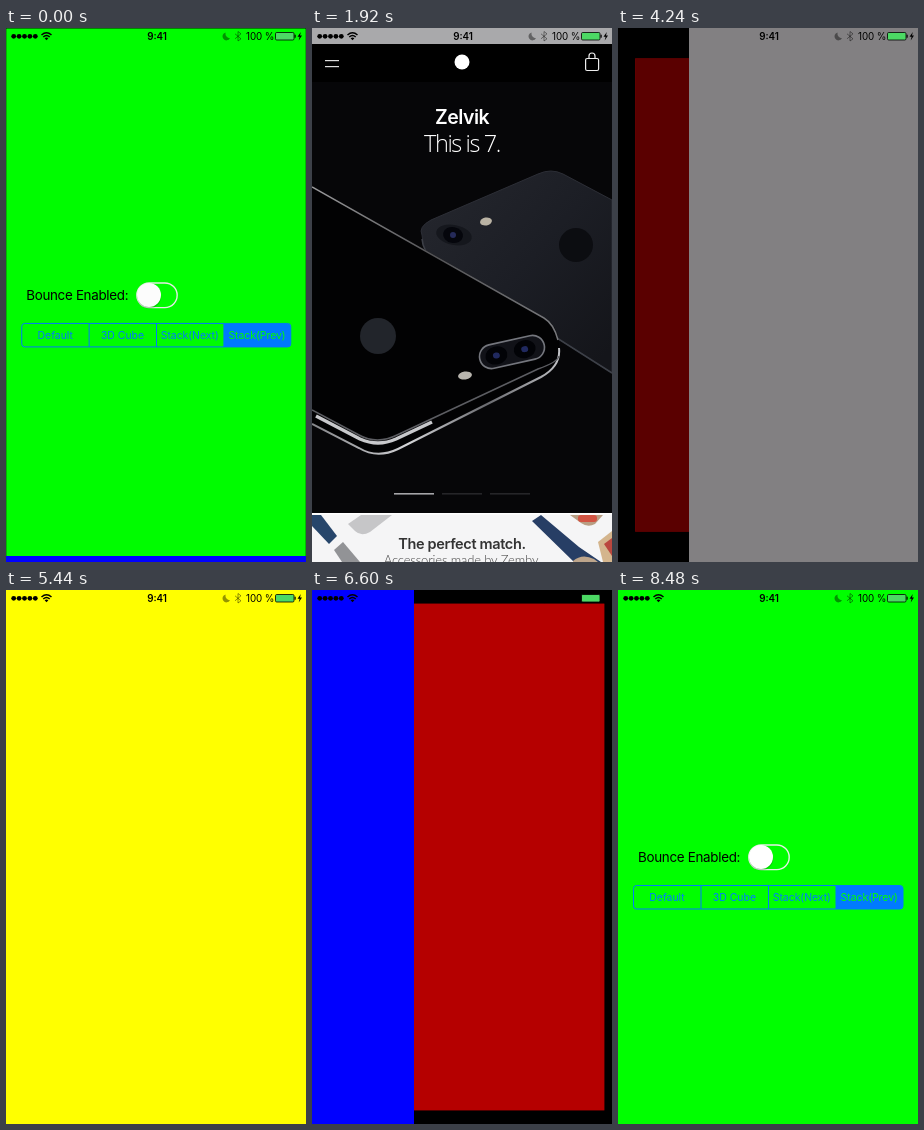
Recreate the animation shown at these times as an HTML page with a canvas. Size 300 by 534 pixels, loop 8.52 s.

```html
<!DOCTYPE html>
<html>
<head>
<meta charset="utf-8">
<style>
html, body { margin: 0; width: 100%; height: 100%; overflow: hidden; background: #000; }
canvas { display: block; }
</style>
</head>
<body>
<canvas width="300" height="534"></canvas>
<script>
const W = 300, H = 534, LOOP = 8520;
const ctx = document.querySelector('canvas').getContext('2d');

function text(str, x, y, font, color, spacing = 0, align = 'center') {
  ctx.font = font + ', sans-serif';
  ctx.fillStyle = color;
  ctx.letterSpacing = spacing + 'px';
  ctx.textAlign = align;
  ctx.fillText(str, x, y);
}

function rect(x, y, w, h, color) {
  ctx.fillStyle = color;
  ctx.fillRect(x, y, w, h);
}

function shape(d, fill, stroke, width = 1) {
  const path = new Path2D(d);
  if (fill) { ctx.fillStyle = fill; ctx.fill(path); }
  if (stroke) { ctx.strokeStyle = stroke; ctx.lineWidth = width; ctx.stroke(path); }
}

function oval(x, y, rx, ry, fill, angle = 0) {
  ctx.beginPath();
  ctx.ellipse(x, y, rx, ry, angle, 0, 7);
  ctx.fillStyle = fill;
  ctx.fill();
}

function box(x, y, w, h, r, fill, stroke, width = 1) {
  ctx.beginPath();
  ctx.roundRect(x, y, w, h, r);
  if (fill) { ctx.fillStyle = fill; ctx.fill(); }
  if (stroke) { ctx.strokeStyle = stroke; ctx.lineWidth = width; ctx.stroke(); }
}

function gradient(x0, y0, x1, y1, ...colors) {
  const g = ctx.createLinearGradient(x0, y0, x1, y1);
  colors.forEach((c, i) => g.addColorStop(i / (colors.length - 1), c));
  return g;
}

const solid = color => () => rect(0, 0, W, H, color);

function settings() {
  rect(0, 0, W, H, '#0f0');
  text('Bounce Enabled:', 20, 272, '13.4px Inter', '#000', -0.3, 'left');

  box(130.8, 255, 40.4, 24.6, 12.3, null, '#e8eee8', 1.4);
  oval(143.2, 268.6, 12, 12, 'rgba(0,0,0,.18)');
  oval(143, 267, 12, 12, '#fff');

  const blue = '#007aff';
  box(217.5, 296, 67.5, 23, [0, 3, 3, 0], blue);
  box(15.5, 295.5, 269.5, 23.5, 3, null, blue);
  [82.5, 150].forEach(x => rect(x, 296, 1, 23, blue));
  ['Default', '3D Cube', 'Stack(Next)', 'Stack(Prev)'].forEach((label, i) =>
    text(label, 49 + i * 67.4, 311, '10.5px Inter', i < 3 ? blue : '#0f0', -0.05));
}

function backPhone() {
  const body = gradient(120, 160, 300, 320, '#24262d', '#1c1e25', '#14151a');
  shape('M110 207Q106 199 119 192L226 146Q239 140 251 146L300 172V345L122 232Q111 224 110 207Z',
    body, '#2c2e36');
  shape('M110 211Q111 224 122 232L300 345', null, '#3d4048', 1.5);
  oval(142, 207, 18, 10, '#15171d', 0.2);
  oval(141, 207, 10, 8, '#05060c', 0.2);
  oval(141, 207, 3, 3, '#252a59');
  oval(174, 193.5, 6, 4, '#bab3a4', -0.2);
  oval(264, 217, 17, 17, '#0c0d11');
}

function frontPhone() {
  shape('M0 158L232 289Q249 299 247 327Q246 341 229 349L86 421Q65 431 47 420L0 397Z', '#020203');
  shape('M0 159L232 290Q242 296 246 312', null, gradient(0, 160, 240, 300, '#9a9a9c', '#535356', '#77787c'), 1.5);
  shape('M247 320Q249 338 229 349L86 421Q65 431 47 420L0 396',
    null, gradient(0, 400, 247, 320, '#85868a', '#d5d6d9', '#6a6b70', '#c3c4c8'), 2);
  shape('M247 328Q246 334 226 341L85 407Q65 417 47 407L0 382', null, '#5c5d62', 1.5);
  shape('M4 388L48 411Q66 419 84 411L120 394', null, '#c8c9cc', 3.5);

  ctx.save();
  ctx.translate(200, 324);
  ctx.rotate(-0.22);
  box(-33, -12, 66, 24, 12, '#111218', '#74767d', 1.6);
  for (const x of [-16, 13]) {
    oval(x, 0, 11, 9, '#020307');
    oval(x, 0, 3.5, 3, '#20295f');
  }
  ctx.restore();
  oval(153, 347.5, 7, 4, '#b8b5ae', -0.15);
  oval(66, 308, 18, 18, '#22252b');
}

function accessories() {
  rect(0, 486, W, 48, '#f5f5f6');
  rect(0, 485, W, 1.5, '#fff');
  const strap = (d, color) => shape(d, color);
  strap('M0 487H9L25 508L17 516L0 498Z', '#27466b');
  strap('M36 496L49 487H80L58 504Q49 509 43 503Z', '#c6c6c8');
  strap('M22 522L31 514L48 534H30Z', '#929396');
  strap('M220 493L229 487L267 519L289 534H262Z', '#273e65');
  strap('M258 487H291L283 496Q276 500 269 495Z', '#b99e83');
  box(266, 487, 19, 7, 3, '#d25443');
  strap('M286 514L300 503V534H291Z', '#d4b58d');
  shape('M292 516L300 510V528Z', '#ba473e');
  strap('M261 533Q270 525 282 531L286 534H261Z', '#bda58b');
  text('The perfect match.', 150, 520.5, '600 14.5px Inter', '#333', -0.35);
  text('Accessories made by Zemby', 149, 536.5, '300 13px Lato', '#444', -0.15);
}

function shop() {
  rect(0, 0, W, H, '#060608');
  rect(0, 0, W, 16, '#a9a9ab');
  rect(0, 16, W, 38, '#000');
  rect(13, 32, 14, 1.2, '#ddd');
  rect(13, 38, 14, 1.2, '#ddd');
  oval(150, 34, 7.5, 7.5, '#fff');
  box(273.6, 30.5, 13, 12, 1.5, null, '#eee', 1.2);
  shape('M277 30V28Q277 25 280 25T283 28V30', null, '#eee', 1.2);

  backPhone();
  frontPhone();
  text('Zelvik', 150, 96, '600 19.5px Inter', '#fff', -0.5);
  text('This is 7.', 150, 123.5, '300 23.5px "Open Sans"', '#fff', -1.4);
  [82, 130, 178].forEach((x, i) => rect(x, 465, 40, 1.6, i ? '#252528' : '#a5a5a8'));
  accessories();
}

function statusBar() {
  for (let i = 0; i < 5; i++) oval(7.7 + i * 5.4, 8.3, 2.4, 2.4, '#000');
  shape('M35.5 7Q40.5 2.5 45.5 7M37.3 9Q40.5 6 43.7 9', null, '#000', 1.5);
  shape('M38.6 10.2Q40.5 8.6 42.4 10.2L40.5 12.3Z', '#000');
  text('9:41', 151, 11.8, '600 9.8px Inter', '#000');
  const dim = 'rgba(0,0,0,.42)';
  shape('M219.5 4.5A4 4 0 1 0 224 10.3A5 5 0 0 1 219.5 4.5Z', dim);
  shape('M229 5.8L235 10.8L232 13V3.5L235 5.8L229 10.8', null, dim);
  text('100 %', 240, 11.8, '9.8px Inter', '#000', -0.1, 'left');
  box(269.5, 4.5, 18.5, 7.5, 1.2, '#4cd964', '#000', 0.8);
  rect(288.5, 6.7, 1.2, 3, '#000');
  shape('M294.8 4L291.5 8.8H293.6L292.7 12.5L296 7.5H294Z', '#000');
}

const blue = solid('#00f'), red = solid('#f00');
const gray = solid('#828082'), yellow = solid('#ff0');

// start ms, duration ms, leaving page, entering page, side it enters from (x, y)
const swipes = [
  [-60, 980, settings, blue, 0, 1],
  [1400, 540, blue, shop, -1, 0],
  [1960, 1040, shop, blue, 1, 0],
  [3190, 750, blue, red, 1, 0],
  [3940, 488, red, gray, 1, 0],
  [4428, 652, gray, yellow, 1, 0],
  [5440, 450, yellow, gray, -1, 0],
  [5890, 458, gray, red, -1, 0],
  [6348, 702, red, blue, -1, 0],
  [7250, 1130, blue, settings, 0, -1],
];

const ease = u => 1 - (1 - u * u) ** 3;

function draw(t) {
  const [start, duration, from, to, dx, dy] = swipes.findLast(s => t >= s[0]);
  const p = ease(Math.min(1, (t - start) / duration));
  rect(0, 0, W, H, '#000');

  if (p < 1) {
    const scale = 1 - 0.15 * p;
    ctx.save();
    ctx.translate(W / 2, H / 2);
    ctx.scale(scale, scale);
    ctx.translate(-W / 2, -H / 2);
    from();
    rect(0, 0, W, H, `rgba(0,0,0,${0.85 * p})`);
    ctx.restore();
  }

  ctx.save();
  ctx.translate(Math.round(dx * W * (1 - p)), Math.round(dy * H * (1 - p)));
  ctx.beginPath();
  ctx.rect(0, 0, W, H);
  ctx.clip();
  to();
  ctx.restore();
  statusBar();
}

function tick() {
  draw(performance.now() % LOOP);
  requestAnimationFrame(tick);
}
tick();
</script>
</body>
</html>
```
